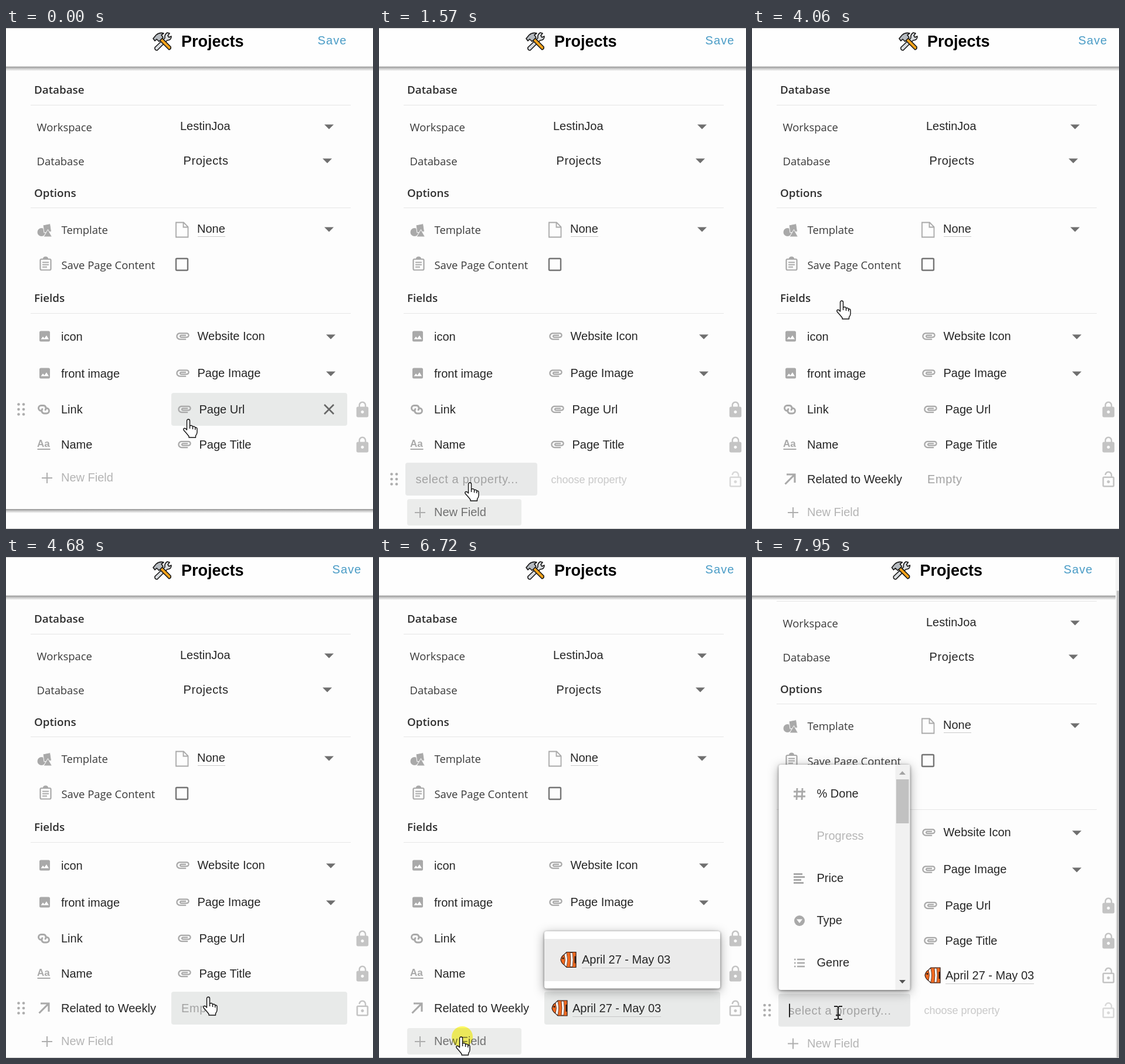
Animation, 626 px wide and 854 px high, one loop 8000 ms. Source, as an HTML page:

```html
<!DOCTYPE html>
<html lang="en">
<head>
<meta charset="utf-8">
<title>Field settings</title>
<style>
html, body { margin: 0; width: 100%; height: 100%; overflow: hidden; background: #fdfdfd; }
svg { display: block; }
text { font: 20px "Liberation Sans", Arial, sans-serif; fill: #262626; white-space: pre; }
.lab { font: 18.4px "Open Sans", "Noto Sans", sans-serif; fill: #3a3a3a; }
.head { font: 600 18.8px "Open Sans", "Noto Sans", sans-serif; fill: #2e2e2e; }
.title { font-size: 27px; font-weight: 700; fill: #000; }
.wide { letter-spacing: .6px; }
.save { letter-spacing: 1.1px; fill: #4a9cc6; }
.hint { fill: #a2a2a2; letter-spacing: .6px; }
.choose { font-size: 18px; fill: #c9c9c9; }
.new { fill: #b4b4b4; }
.new.hot { fill: #707070; }
.off { fill: #b6b6b6; }
.aa { font: 700 17px "Liberation Sans", Arial, sans-serif; fill: #a9a9a9; }
.float { filter: drop-shadow(0 1px 2px #0007) drop-shadow(0 4px 9px #0005); }
#spot { mix-blend-mode: multiply; }
</style>
</head>
<body>
<svg id="stage" width="626" height="854" viewBox="0 0 626 854">
  <defs>
    <linearGradient id="shade" x2="0" y2="1">
      <stop offset="0" stop-color="#8e8e8e"/><stop offset=".4" stop-color="#c4c4c4"/><stop offset="1" stop-color="#fdfdfd"/>
    </linearGradient>
    <path id="tri" d="M-8-4H8L0 4Z" fill="#6f6f6f"/>
    <path id="cross" d="M-8-8L8 8M8-8L-8 8" stroke="#666" stroke-width="2.6"/>
    <g id="image" fill="#a9a9a9"><rect x="-9" y="-9" width="18" height="18" rx="2.5"/><path d="M-6.5 5L-3 .5L-.5 3.5L3-1.5L7 5Z" fill="#fff"/></g>
    <path id="clip" fill="#a9a9a9" transform="translate(-13.4 -14) scale(1.12)" d="M2 12.5C2 9.46 4.46 7 7.5 7H18c2.21 0 4 1.79 4 4s-1.79 4-4 4H9.5C8.12 15 7 13.88 7 12.5S8.12 10 9.5 10H17v2H9.41c-.55 0-.55 1 0 1H18c1.1 0 2-.9 2-2s-.9-2-2-2H7.5C5.57 9 4 10.57 4 12.5S5.57 16 7.5 16H17v2H7.5C4.46 18 2 15.54 2 12.5z"/>
    <path id="lock" transform="translate(-15.4 -14.7) scale(1.28)" d="M18 8h-1V6c0-2.76-2.24-5-5-5S7 3.24 7 6v2H6c-1.1 0-2 .9-2 2v10c0 1.1.9 2 2 2h12c1.1 0 2-.9 2-2V10c0-1.1-.9-2-2-2zm-6 9c-1.1 0-2-.9-2-2s.9-2 2-2 2 .9 2 2-.9 2-2 2zm3.1-9H8.9V6c0-1.71 1.39-3.1 3.1-3.1 1.71 0 3.1 1.39 3.1 3.1v2z"/>
    <path id="unlock" transform="translate(-15.4 -14.7) scale(1.28)" d="M12 17c1.1 0 2-.9 2-2s-.9-2-2-2-2 .9-2 2 .9 2 2 2zm6-9h-1V6c0-2.76-2.24-5-5-5S7 3.24 7 6h1.9c0-1.71 1.39-3.1 3.1-3.1 1.71 0 3.1 1.39 3.1 3.1v2H6c-1.1 0-2 .9-2 2v10c0 1.1.9 2 2 2h12c1.1 0 2-.9 2-2V10c0-1.1-.9-2-2-2zm0 12H6V10h12v10z"/>
    <g id="link" fill="none" stroke="#a9a9a9" stroke-width="2.9" stroke-linecap="round">
      <path d="M-3.500 2.500H-4.500A4.500 4.500 0 0 1-4.500-6.500H-1A4.500 4.500 0 0 1 2.500 1"/><path d="M3.500-2H4.500A4.500 4.500 0 0 1 4.500 7H1A4.500 4.500 0 0 1-2.500-.5"/>
    </g>
    <path id="arrow" d="M-8.5 8.5L8-8M-6-8H8V6" fill="none" stroke="#a9a9a9" stroke-width="3.1"/>
    <g id="aa"><text class="aa" x="-11.5" y="4">Aa</text><path d="M-11 8H11" stroke="#a9a9a9" stroke-width="2"/></g>
    <path id="hash" d="M-4-10L-5 10M5-10L4 10M-10-4H10M-10 4H10" stroke="#a9a9a9" stroke-width="2.8"/>
    <path id="lines" d="M-10-7.5H5M-10-2.5H9M-10 2.5H3M-10 7.5H7" stroke="#a9a9a9" stroke-width="2.8"/>
    <g id="pick"><circle r="9" fill="#a9a9a9"/><path d="M-5-2.5H5L0 4Z" fill="#fff"/></g>
    <path id="list" d="M-9-6H-6.5M-9 0H-6.5M-9 6H-6.5M-4-6H9M-4 0H9M-4 6H9" stroke="#a9a9a9" stroke-width="2.5"/>
    <g id="fish">
      <path d="M-13 0Q-12-6-7-9L-3-13H13V13H-3L-7 9Q-12 6-13 0Z" fill="#f26a21" stroke="#2a1712" stroke-width="1.2"/>
      <path d="M-7-9L-3-12Q0 0-3 12L-7 9Q-4 0-7-9ZM3-12H7Q9 0 7 12H3Q5 0 3-12Z" fill="#fff" stroke="#2a1712" stroke-width=".7"/>
      <path d="M10.500-6H13V6H10.500Z" fill="#2a1712"/><circle cx="-9" cy="-2.500" r="1.500" fill="#1b1b1b"/>
    </g>
  </defs>

  <rect width="626" height="854" fill="#fdfdfd"/>
  <g id="page">
    <path d="M42 131.5H588M42 306.5H588M42 486.5H588" stroke="#e6e6e6"/>
    <text class="head" x="48" y="112">Database</text>
    <text class="head" x="48" y="288">Options</text>
    <text class="head" x="48" y="467">Fields</text>
    <text class="lab" x="52.5" y="176">Workspace</text><text x="297" y="174">LestinJoa</text>
    <text class="lab" x="52.5" y="234">Database</text><text class="wide" x="302.500" y="233">Projects</text>
    <use href="#tri" x="551" y="168.5"/><use href="#tri" x="548" y="226.5"/><use href="#tri" x="551" y="343.5"/>
    <g transform="translate(66 345)" fill="#a9a9a9" stroke="#fdfdfd"><circle cx="-5.500" cy="3" r="7" stroke="none"/><path d="M-3-9L9.500-11.500L11.500 2L-1 4Z"/><path d="M5.500-1.500L12.500 11H-2Z"/></g>
    <text class="lab" x="94.5" y="351">Template</text>
    <path d="M290 331.5H303L310.5 339V356.5H290ZM302.5 331.5V339.5H310.5" fill="none" stroke="#a9a9a9" stroke-width="1.8"/>
    <text x="326" y="349">None</text><path d="M327 355.5H374" stroke="#c9c9c9"/>
    <g fill="none" stroke="#a9a9a9" stroke-width="2.2"><rect x="58.5" y="394" width="18" height="18.5" rx="2"/><path d="M62 399.5H73M62 403.5H73M62 407.5H70"/><path d="M64 393.5A3.5 3 0 0 1 71 393.5" fill="#a9a9a9"/></g>
    <text class="lab" x="94.5" y="411">Save Page Content</text>
    <rect x="290" y="393" width="20" height="20" rx="1.5" fill="none" stroke="#757575" stroke-width="2.4"/>
    <g id="rows"></g>
    <g id="add"><rect id="addBox" x="48" y="-22" width="195" height="45" rx="4" fill="#ebeceb"/>
      <path d="M61 1H79M70-8V10" stroke="#aeaeae" stroke-width="2"/><text id="addText" class="new" x="94" y="7">New Field</text></g>
    <path id="caret" stroke="#222" stroke-width="2"/>
  </g>
  <g id="edge"><rect y="820" width="626" height="7" fill="url(#shade)"/><rect y="827" width="626" height="27" fill="#fefefe"/></g>

  <g id="popup"><rect class="float" x="282" y="638" width="300" height="97.5" rx="4" fill="#fff"/>
    <rect x="282" y="651" width="300" height="72" fill="#ebebeb"/>
    <use href="#fish" x="323" y="686.5"/><text x="346" y="693">April 27 - May 03</text><path d="M346 700.5H497" stroke="#c9c9c9"/></g>

  <g id="menu"><rect class="float" x="45.5" width="224" height="384" rx="4" fill="#fdfdfd"/>
    <svg x="46" y="0" width="223" height="384"><g id="items"></g>
      <rect x="198.500" width="25" height="384" fill="#f1f1f1"/>
      <path id="upArrow" d="M205 17H216L210.500 11Z"/><path d="M205 367H216L210.500 373Z" fill="#555"/>
      <rect id="thumb" x="200" width="21.500" height="75" fill="#c1c1c1"/></svg></g>

  <g id="bar"><rect x="620" width="6" height="854" fill="#f3f3f3"/><rect id="barThumb" x="622" width="4" height="798" fill="#c1c1c1"/></g>
  <g id="header"><rect id="headShade" y="65.500" width="626" height="8" fill="url(#shade)"/><rect id="headBox" width="626" height="65.500" fill="#fefefe"/>
    <g id="brand">
      <g stroke-linejoin="round" stroke="#161616" stroke-width="1.6">
        <path d="M254 33L271 17Q270 11 275 8L279 9L276 13L278 16L282 14Q282 21 275 21L258 38Q253 38 254 33Z" fill="#d9dcdf"/>
        <path d="M260 19L264 15L281 32Q282 36 278 37Z" fill="#f5a31a"/>
        <path d="M251 18L256 12Q262 7 269 9L265 12L268 16L261 23L257 19L254 22Z" fill="#b5babf"/>
      </g>
      <text class="title" x="299" y="32">Projects</text></g>
    <text id="save" class="save" y="28">Save</text></g>
  <path d="M0 .5H626M0 853.500H626" stroke="#c9c9c9"/>

  <circle id="spot" r="18" fill="#fffb62"/>
  <g id="hand" fill="#fff" stroke="#111" stroke-width="1.4" stroke-linejoin="round">
    <path d="M-2.500 18V2.500a2.500 2.500 0 0 1 5 0V11q4-1.500 5 1.500q3.500-1 4.200 1.500q3.200-.5 3.300 2.500V22q0 3-2.500 6V31H1V29q-3-4-8.500-10q-2-3 1-3.700q2 0 4 2.700Z"/>
    <path d="M2.500 11V16M7.500 12.500V17M11.700 14V18" fill="none"/></g>
  <path id="beam" d="M-7-11H-2L0-9.500L2-11H7M-7 11H-2L0 9.500L2 11H7M0-10V10M-4 4H4" fill="none" stroke="#222" stroke-width="2"/>
</svg>
<script>
const LOOP = 8000, ADD1 = 760, OPEN1 = 1940, PICKED = 3990, POP = 4840, CHOSEN = 6040, ADD2 = 6790, OPEN2 = 7760;
const $ = id => document.getElementById(id);
const show = (id, on) => $(id).style.display = on ? '' : 'none';
const move = (id, x, y) => $(id).setAttribute('transform', `translate(${x} ${y})`);
const set = (id, name, v) => $(id).setAttribute(name, v);
const between = (t, a, b) => t >= a && t < b;

// t, x, y of the pointer's hot spot
const path = [[0, 311, 667], [70, 311, 667], [560, 150, 764], [930, 150, 764], [1200, 165, 654], [1530, 155, 775],
  [1890, 155, 775], [2160, 171, 661], [2760, 171, 661], [2900, 169, 661], [3130, 169, 661], [3590, 153, 465],
  [4070, 153, 465], [4460, 330, 772], [4680, 345, 750], [5440, 345, 750], [5790, 387, 694], [6080, 387, 694],
  [6560, 140, 818], [6800, 140, 818], [7200, 137, 711], [7300, 137, 711], [7550, 147, 777], [8000, 147, 777]];
const menuScroll = [[0, 0], [2220, 0], [2410, 333], [2520, 333], [2590, 433], [5000, 433], [5001, 0], [8000, 0]];
const pageScroll = [[0, 0], [7160, 0], [7235, 7], [7245, 7], [7520, 56], [8000, 56]];
const clicks = [[640, 740], [1800, 1890], [3920, 3990], [4770, 4840], [5925, 6040], [6640, 6750], [7640, 7720]];
// from, to, row, caret x
const focus = [[1840, PICKED, 5, 64], [4770, CHOSEN, 5, 301], [CHOSEN, ADD2, 5, 499], [7640, LOOP, 6, 64]];

function at(keys, t, k = 1) {
  const i = Math.max(1, keys.findIndex(p => p[0] > t)), a = keys[i - 1], b = keys[i];
  const u = (t - a[0]) / (b[0] - a[0]);
  return a[k] + (b[k] - a[k]) * u * u * (3 - 2 * u);
}

const use = (id, x, y = 0) => `<use href="#${id}" x="${x}" y="${y}"/>`;
const txt = (x, y, s, c = '') => `<text class="${c}" x="${x}" y="${y}">${s}</text>`;
const lock = (id, c = '#c4c4c4') => `<g fill="${c}">${use(id, 608)}</g>`;
const field = (icon, x, name) => use(icon, x) + txt(94, 7, name);
const clipped = (x, s) => use('clip', x) + txt(x + 25, 6.5, s);
const blank = txt(62.5, 7, 'select a property...', 'hint') + txt(293.5, 6.5, 'choose property', 'choose') + lock('unlock', '#d9d9d9');

const rows = [
  { y: 525.5, body: field('image', 66, 'icon') + clipped(301.5, 'Website Icon') + use('tri', 554, 1) },
  { y: 588.5, body: field('image', 66, 'front image') + clipped(301.5, 'Page Image') + use('tri', 554, 1) },
  { y: 650, body: field('link', 64.5, 'Link') + clipped(304.5, 'Page Url') + lock('lock'), clear: 1 },
  { y: 710, body: field('aa', 64.5, 'Name') + clipped(304.5, 'Page Title') + lock('lock'), clear: 1 },
  { y: 769, body: `<g id="blank5">${blank}</g><g id="rel">${field('arrow', 65, 'Related to Weekly')}${lock('unlock')}
    <g id="empty">${txt(299, 7, 'Empty', 'hint')}</g><g id="date">${use('fish', 308)}${txt(330, 6.5, 'April 27 - May 03')}<path d="M330 14.500H481" stroke="#c9c9c9"/></g></g>` },
  { y: 828.5, body: blank }];

const dots = [-8.5, 0, 8.5].map(y => `<circle cx="21.500" cy="${y}" r="2.300"/><circle cx="30" cy="${y}" r="2.300"/>`).join('');
$('rows').innerHTML = rows.map((r, i) => `<g id="row${i + 1}" transform="translate(0 ${r.y})">
  <rect id="l${i + 1}" x="45" y="-28" width="225" height="56" rx="4" fill="#e8e9e9"/>
  <rect id="v${i + 1}" x="282" y="-28" width="300" height="56" rx="4" fill="#e8eae9"/>
  <g id="d${i + 1}" fill="#adadad">${dots}</g>${r.body}
  <g id="lx${i + 1}">${use('cross', 239)}</g><g id="vx${i + 1}">${use('cross', 551)}</g></g>`).join('');

const options = [['hash', '% Done'], ['', 'Progress', 1], ['lines', 'Price'], ['pick', 'Type'], ['list', 'Genre'], ['pick', 'Priority'],
  ['link', 'Link', 1], ['arrow', 'Related to|Weekly', 0, 55], ['', 'Media', 1], ['', 'Publication|Date', 1, 57], ['aa', 'Name', 1]];
let bottom = 13;
$('items').innerHTML = '<rect id="hot" y="301" width="199" height="72" fill="#f3f3f3"/>' + options.map(([icon, name, off, x = 65]) => {
  const parts = name.split('|'), tall = parts.length > 1, height = tall ? 75 : 72;
  bottom += height;
  return `<g transform="translate(0 ${bottom - height / 2})"><g opacity="${off ? .6 : 1}">${icon && use(icon, 35, tall ? 0 : 1)}</g>` +
    parts.map((s, k) => txt(x - .5, (tall ? -8 : 7) + 29 * k, s, off ? 'off' : '')).join('') + '</g>';
}).join('');

function draw(t) {
  const x = at(path, t), y = at(path, t, 2), scroll = at(pageScroll, t);
  const menu1 = between(t, OPEN1, PICKED), menu2 = t >= OPEN2, popup = between(t, POP, ADD2);
  const added = t >= ADD1, narrow = t >= ADD2, picked = t >= PICKED, chosen = t >= CHOSEN;
  const count = narrow ? 6 : added ? 5 : 4;

  move('page', 0, -scroll);
  show('edge', !added);
  move('add', 0, narrow ? 884.5 : added ? 825 : 766);
  const addHot = between(t, 500, OPEN1) || between(t, 6480, ADD2);
  show('addBox', addHot);
  $('addText').classList.toggle('hot', addHot);

  show('blank5', !picked); show('rel', picked); show('empty', !chosen); show('date', chosen);

  const f = focus.find(k => between(t, k[0], k[1]));
  const covered = menu1 && y > 351 && y < 735 || popup && y > 638 && y < 736 && x > 282;
  rows.forEach((r, i) => {
    const n = i + 1, over = n <= count && !covered && Math.abs(y + scroll - r.y) < 28.5;
    const left = over && x >= 45 && x < 270, right = over && x >= 282 && x < 582;
    const focused = f && f[2] === n, value = focused && f[3] > 200;
    show('row' + n, n <= count);
    show('d' + n, over);
    show('l' + n, left || focused && !value);
    show('v' + n, right || value);
    show('lx' + n, left && (r.clear || n === 5 && picked));
    show('vx' + n, right && r.clear);
  });

  const blink = f && (t - (f[3] === 499 ? 4770 : f[0])) % 1060 < 530;
  show('caret', blink);
  if (f) set('caret', 'd', `M${f[3]} ${rows[f[2] - 1].y - 11}v23`);

  show('popup', popup);
  $('popup').style.opacity = Math.min(1, (t - POP) / 140);
  show('menu', menu1 || menu2);
  $('menu').style.opacity = Math.min(1, (t - (menu2 ? OPEN2 : OPEN1)) / 140);
  const ms = at(menuScroll, t);
  move('menu', 0, menu2 ? 354 : 351);
  move('items', 0, -ms);
  set('thumb', 'y', 25 + ms * .195);
  set('upArrow', 'fill', ms > 0 ? '#444' : '#a3a3a3');
  show('hot', between(t, 2120, 3130));

  show('bar', narrow);
  set('barThumb', 'y', 6 + scroll * .92);
  set('headBox', 'width', narrow ? 620 : 626);
  set('headShade', 'width', narrow ? 620 : 626);
  move('brand', narrow ? -12.5 : 0, 0);
  set('save', 'x', added && !narrow ? 556.5 : 531.5);

  const beam = t >= 7540;
  show('hand', !beam); show('beam', beam);
  move('hand', x, y); move('beam', x, y);
  show('spot', clicks.some(c => between(t, c[0], c[1])));
  move('spot', x + 2, y);
}

const start = performance.now();
function tick() {
  draw((performance.now() - start) % LOOP);
  requestAnimationFrame(tick);
}
draw(0);
requestAnimationFrame(tick);
</script>
</body>
</html>
```
